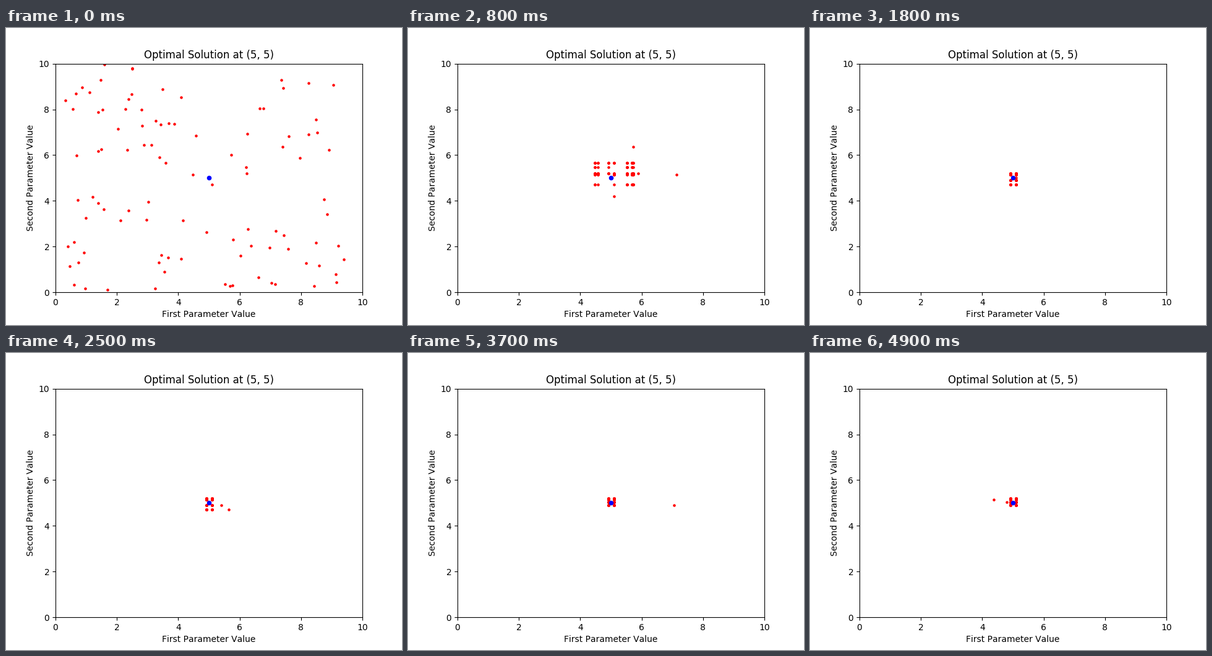
Write a matplotlib script that moves like this. It is 640 by 480 pixels and loops after 5000 ms.

```python
import math

import matplotlib.pyplot as plt
import numpy as np
from matplotlib.animation import FuncAnimation

GENERATIONS = 50
INTERVAL = 100
POPULATION = 100
OPTIMUM = 5
SEED = 11

# Individuals whose coordinates survive the longest
FOUNDERS = [(4.47, 5.15), (4.91, 2.63), (5.11, 4.70), (5.52, .36),
            (4.57, 6.86), (6.22, 5.20), (6.21, 5.47), (3.59, 5.67)]
# Lucky mutations of the second parameter: value and generation of birth
DISCOVERIES = [(4.89, 14), (5.05, 28)]


def first_population():
    """Founders plus random individuals that share no coordinate with the optimum."""
    rng = np.random.default_rng(SEED)
    points = rng.uniform((.1, 0), (9.4, 10), (3 * POPULATION, 2))
    outside = (abs(points - OPTIMUM) > .65).all(axis=1)
    return np.vstack([FOUNDERS, points[outside]])[:POPULATION]


FIRST = first_population()


def survival_radius(generation):
    return .265 + .95 * math.exp(-generation / 10) + 4 * math.exp(-generation / 2)


def gene_pools(generation):
    radius = survival_radius(generation)
    xs, ys = (genes[abs(genes - OPTIMUM) < radius] for genes in FIRST.T)
    born = [value for value, birth in DISCOVERIES if birth <= generation]
    return xs, np.append(ys, born)


def population(generation):
    if generation == 0:
        return FIRST
    rng = np.random.default_rng(SEED + generation)
    points = np.column_stack([rng.choice(pool, POPULATION)
                              for pool in gene_pools(generation)])
    mutants = rng.integers(1, 5) + int(8 * math.exp(-generation / 6))
    axes = rng.integers(0, 2, mutants)
    points[np.arange(mutants), axes] = rng.normal(OPTIMUM, 1.5, mutants)
    return points


plt.rcParams.update({"font.family": "DejaVu Sans", "text.kerning_factor": 6})
fig, ax = plt.subplots(figsize=(6.4, 4.8), dpi=100)
ax.set(xlim=(0, 10), ylim=(0, 10), title="Optimal Solution at (5, 5)",
       xlabel="First Parameter Value", ylabel="Second Parameter Value")
dots = ax.scatter(*FIRST.T, s=5, color="red")
ax.scatter(OPTIMUM, OPTIMUM, s=20, color="blue", zorder=3)


def update(generation):
    dots.set_offsets(population(generation))
    return dots,


anim = FuncAnimation(fig, update, frames=GENERATIONS, interval=INTERVAL,
                     repeat=True, repeat_delay=0)
plt.show()
```
